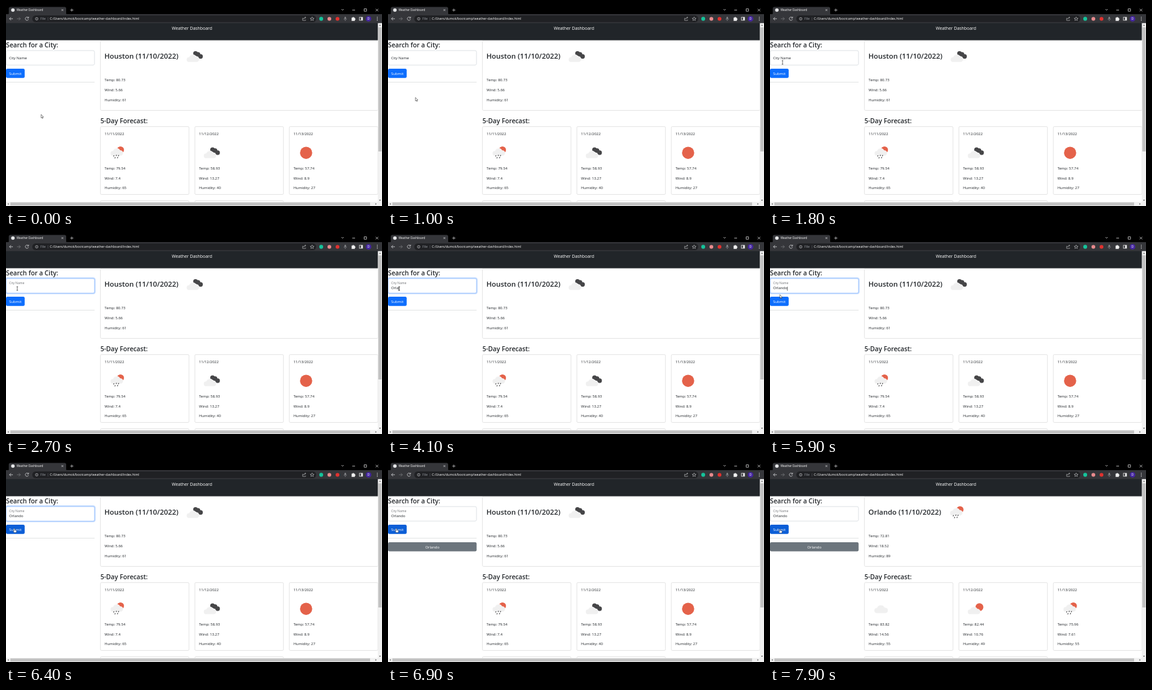
These frames come from a looping animation (600x319 px, 8000 ms). An HTML page:

```html
<!DOCTYPE html>
<html lang="en">
<head>
<meta charset="utf-8">
<title>Weather Dashboard</title>
<style>
html, body { margin: 0; width: 100%; height: 100%; overflow: hidden; background: #fff; }
svg { display: block; width: 600px; height: 319px; }
text { font-family: "Open Sans", "Noto Sans", sans-serif; white-space: pre; }
</style>
</head>
<body>
<svg id="stage" viewBox="0 0 600 319" xmlns="http://www.w3.org/2000/svg"></svg>
<script>
const stage = document.getElementById('stage');
const LOOP = 8000, STEP = 100;

// ---- markup helpers ----
const text = (x, y, size, str, fill = '#212529', extra = '') =>
  `<text x="${x}" y="${y}" font-size="${size}" fill="${fill}" ${extra}>${str}</text>`;
const rect = (x, y, w, h, fill, extra = '') =>
  `<rect x="${x}" y="${y}" width="${w}" height="${h}" fill="${fill}" ${extra}/>`;
const dot = (x, y, r, fill) => `<circle cx="${x}" cy="${y}" r="${r}" fill="${fill}"/>`;
const line = (d, color, w = 0.7) =>
  `<path d="${d}" fill="none" stroke="${color}" stroke-width="${w}"/>`;
const poly = (d, fill) => `<path d="${d}" fill="${fill}"/>`;
const card = (x, y, w, h) => rect(x, y, w, h, '#fff', 'rx="1.8" stroke="#d9d9d9" stroke-width=".7"');
const heading = (x, y, size, s) => text(x, y, size, s, '#212529', 'font-weight="600"');

// ---- weather icons, drawn around their centre ----
const SUN = '#e4624a', LIGHT = '#f0f0f0', DARK = '#464648';
const cloud = (x, y, s) =>
  `<path transform="translate(${x} ${y}) scale(${s})" fill="${LIGHT}" stroke="#fff" stroke-width=".6"
   d="M4 13A4 4 0 0 1 4.2 5A6.2 6.2 0 0 1 15.6 4.6A4.2 4.2 0 0 1 16.8 13Z"/>`;
const storm = dot(1.4, -5.2, 3.7, DARK) + dot(5.4, -3.8, 3.6, DARK) + dot(9.4, -0.6, 3.7, DARK);
const drops = [[-5, 4.7], [-1, 3.8], [2.5, 4.2], [-3, 7.7], [1, 7.3]]
  .map(([x, y]) => line(`M${x} ${y - 0.9}l-.9 1.8`, DARK, 1.2)).join('');
const icons = {
  sun: dot(0, -0.3, 9.7, SUN),
  cloud: cloud(-11.5, -7.5, 1.1),
  broken: storm + cloud(-13, -4.5, 1),
  partly: dot(6, -3, 6.3, SUN) + cloud(-13, -4.5, 1),
  rain: dot(5.2, -5, 5.6, SUN) + cloud(-11, -8.5, 1) + drops
};
const icon = (name, x, y) => `<g transform="translate(${x} ${y})">${icons[name]}</g>`;

// ---- forecasts: icon, temp, wind, humidity ----
const reports = [
  { city: 'Houston', iconX: 301, days: [
    ['broken', '80.73', '5.66', '61'], ['rain', '79.54', '7.4', '65'],
    ['broken', '58.93', '13.27', '40'], ['sun', '57.74', '8.9', '27']] },
  { city: 'Orlando', iconX: 298, days: [
    ['rain', '72.81', '18.52', '89'], ['cloud', '83.82', '14.56', '55'],
    ['partly', '82.44', '10.76', '49'], ['rain', '75.96', '7.61', '55']] }
];
const stats = (x, y, [, temp, wind, hum]) =>
  [`Temp: ${temp}`, `Wind: ${wind}`, `Humidity: ${hum}`]
    .map((s, i) => text(x, y + i * 15.7, 5.9, s)).join('');
const report = ({ city, iconX, days }) =>
  heading(157, 84.4, 11.4, `${city} (11/10/2022)`) +
  icon(days[0][0], iconX, 81) + stats(157.3, 120.4, days[0]) +
  days.slice(1).map((day, i) => {
    const x = 157.3 + i * 150.7;
    return text(x, 206.2, 5.9, `11/${11 + i}/2022`) +
      icon(day[0], x + 20.2, 234.5) + stats(x, 260.8, day);
  }).join('');

// ---- browser window ----
function chrome() {
  const g = '#d4d5d7';
  return rect(0, 0, 600, 14, '#000') +
    poly('M2 14Q4.5 14 4.5 11V4Q4.5 1.5 7 1.5H93.5Q96 1.5 96 4V11Q96 14 98.5 14Z', '#35363a') +
    rect(0, 13, 600, 14.3, '#35363a') +
    dot(11, 6.5, 2.8, '#e4e5e7') +
    text(17, 8.3, 4.5, 'Weather Dashboard', '#fff') +
    line('M88.5 5l3 3m0 -3l-3 3M102.5 6.5h5m-2.5 -2.5v5', g) +
    line('M535.3 5l1.8 1.8l1.8 -1.8M552.5 6.5h4.5M571.5 4.5h3.8v3.8h-3.8zM590 4.5l4 4m0 -4l-4 4', '#f0f0f0', 0.7) +
    line('M11 20.3h-5.5m2.5 -2.5l-2.5 2.5l2.5 2.5', g, 0.8) +
    line('M17.5 20.3h5.5m-2.5 -2.5l2.5 2.5l-2.5 2.5', '#77797c', 0.8) +
    line('M35.6 18.8a2.6 2.6 0 1 0 .3 2.3M36 17v2.2h-2.2', g, 0.8) +
    rect(42, 15, 453, 10.8, '#202124', 'rx="5.4"') +
    `<circle cx="49" cy="20.4" r="2.1" fill="none" stroke="${g}" stroke-width=".6"/>` +
    line('M49 20v1.5M49 19v.5', g, 0.5) +
    text(55, 22.3, 5.2, 'File', '#9aa0a6') + line('M67 18v5', '#6a6d70', 0.5) +
    text(70, 22.3, 5.18, 'C:/Users/dumok/bootcamp/weather-dashboard/index.html', '#fff') +
    line('M474.5 19.5h-1.2v3.5h4.8v-1.2M475 21q.3 -2.6 3.3 -2.6m-1.3 -1.2l1.3 1.2l-1.3 1.2', g, 0.6) +
    line('M488.5 17.5l.9 1.9l2.1 .2l-1.6 1.4l.5 2.1l-1.9 -1.1l-1.9 1.1l.5 -2.1l-1.6 -1.4l2.1 -.2z', g, 0.6) +
    dot(503, 20.4, 3.1, '#15c39a') + dot(516, 20.4, 3, '#e88a8d') + dot(529, 20.4, 3, '#e0322f') +
    rect(540.3, 17.3, 2.2, 3.8, '#8f9194', 'rx="1.1"') +
    line('M539.3 20q0 2.3 2.1 2.3t2.1 -2.3M541.4 22.3v1.5', '#8f9194', 0.6) +
    poly('M551.5 18.5h1.6a1 1 0 0 1 2 0h1.6v1.6a1 1 0 0 1 0 2v1.6h-5.2z', '#f0f0f0') +
    rect(564, 18, 5, 4.8, 'none', 'stroke="#f0f0f0" stroke-width=".8"') + rect(566.7, 18, 2.3, 4.8, '#f0f0f0') +
    dot(578.5, 20.4, 4.4, '#4527a0') +
    text(578.5, 22.2, 4.8, 'D', '#fff', 'text-anchor="middle"') +
    [18, 20.4, 22.8].map(y => dot(592.5, y, 0.7, g)).join('');
}

function scrollbars() {
  return rect(593.4, 27, 6.6, 292, '#f1f1f1') + rect(0, 312.5, 600, 6.5, '#f1f1f1') +
    rect(594.2, 34, 5.2, 198, '#c1c1c1') + rect(7, 313.3, 574, 5, '#c1c1c1') +
    poly('M595.3 31.5l1.5 -1.9l1.5 1.9zM595.3 309l1.5 1.9l1.5 -1.9zM4.4 314.3l-1.9 1.5l1.9 1.5zM589.5 314.3l1.9 1.5l-1.9 1.5z', '#606060');
}

stage.innerHTML =
  rect(0, 0, 600, 319, '#fff') +
  card(150.7, 55, 443, 111.5) +
  [0, 1, 2].map(i => card(150.7 + i * 150.7, 192.3, 141.3, 108.3)).join('') +
  [0, 1].map(i => card(150.7 + i * 150.7, 310.5, 141.3, 30)).join('') +
  rect(0, 27, 600, 27.6, '#212529') +
  text(296.7, 38, 6.9, 'Weather Dashboard', '#fff', 'text-anchor="middle"') +
  heading(0, 65.6, 10.25, 'Search for a City:') + heading(150.7, 187, 10.25, '5-Day Forecast:') +
  rect(-0.6, 70.2, 142.6, 24.9, 'none', 'id="ring" rx="3" stroke="#0d6efd" stroke-opacity=".25" stroke-width="1.8"') +
  rect(0.3, 71.1, 140.9, 23.1, '#fff', 'id="field" rx="2.2" stroke-width=".7"') +
  '<text id="label" fill="#212529">City Name</text>' +
  text(5, 88.4, 5.9, '', '#212529', 'id="value"') +
  rect(0, 84, 0.6, 6.6, '#111', 'id="caret"') +
  rect(0, 100, 29.8, 14.7, '#0d6efd', 'id="submit" rx="2.3"') +
  text(14.9, 109.6, 6, 'Submit', '#fff', 'text-anchor="middle"') +
  rect(0, 121, 141.4, 0.6, '#cfd0d1') +
  `<g id="history">${rect(0, 128, 141.4, 14.6, '#6c757d', 'rx="2.3"')}${
    text(70.7, 137.5, 5.9, 'Orlando', '#fff', 'text-anchor="middle"')}</g>` +
  reports.map((r, i) => `<g id="report${i}">${report(r)}</g>`).join('') +
  scrollbars() + chrome() +
  `<g id="pointer">
    <path id="arrow" d="M0 0V5.6L1.3 4.4L2.2 6.4L3 6L2.2 4.1H3.9Z" fill="#fff" stroke="#111" stroke-width=".5"/>
    <path id="beam" d="M-1.2 -3H1.2M0 -3V3M-1.2 3H1.2" fill="none" stroke="#111" stroke-width=".6"/>
    <path id="hand" d="M-.6 0Q0 -.7 .6 0V2.2L3 2.8Q3.5 3 3.4 3.6L2.8 6H-.6L-2.2 3.6Q-2 2.9 -1.3 3.3L-.6 3.9Z" fill="#fff" stroke="#111" stroke-width=".4"/>
  </g>`;

const el = id => document.getElementById(id);
const show = (id, on) => el(id).setAttribute('display', on ? 'inline' : 'none');
const set = (id, attrs) => { for (const k in attrs) el(id).setAttribute(k, attrs[k]); };
const clamp = v => Math.max(0, Math.min(1, v));
const ease = v => v * v * (3 - 2 * v);
const mix = (a, b, k) => a + (b - a) * k;

// ---- timeline ----
const path = [
  [0, 56, 173], [400, 56, 173], [700, 50, 161], [800, 50, 161], [1700, 22, 93],
  [1900, 18, 87], [5700, 18, 87], [6100, 13.5, 106.5], [7300, 13.5, 106.5],
  [7500, 14.2, 106.8], [7800, 14.2, 106.8], [7900, 16, 107.2], [8000, 16, 107.2]
];
const keys = [3400, 3700, 3900, 4100, 4300, 4500, 4800];
const FOCUS = 2050, BLUR = 6450, ADDED = 6700, LOADED = 7400;

function pointerAt(t) {
  const i = path.findIndex((p, n) => n && t <= p[0]);
  const [t0, x0, y0] = path[i - 1], [t1, x1, y1] = path[i];
  const k = (t - t0) / (t1 - t0);
  return [mix(x0, x1, k), mix(y0, y1, k)];
}

function draw(now) {
  const t = Math.floor((now % LOOP) / STEP) * STEP;

  const [x, y] = pointerAt(t);
  const inField = y > 71 && y < 94.5 && x < 141;
  const onSubmit = y > 100 && y < 115 && x < 30;
  set('pointer', { transform: `translate(${x} ${y})` });
  show('beam', inField);
  show('hand', onSubmit);
  show('arrow', !inField && !onSubmit);
  set('submit', { fill: onSubmit ? '#0b5ed7' : '#0d6efd' });

  const glow = clamp((t - FOCUS) / 150) * (1 - clamp((t - BLUR) / 150));
  set('ring', { opacity: glow });
  set('field', { stroke: `rgb(${mix(206, 134, glow)},${mix(212, 183, glow)},${mix(218, 254, glow)})` });

  const up = ease(clamp((t - FOCUS) / 100));
  set('label', { x: 5, y: mix(85.2, 79.8, up), 'font-size': mix(5.9, 5.05, up), opacity: mix(1, 0.65, up) });

  const typed = keys.filter(k => k <= t).length;
  el('value').textContent = 'Orlando'.slice(0, typed);
  const since = t - (typed ? keys[typed - 1] : 2200);
  show('caret', t >= FOCUS && t < BLUR && (since < 0 || since % 1000 < 500));
  set('caret', { x: 5 + (typed ? el('value').getComputedTextLength() : 0) });

  show('history', t >= ADDED);
  show('report0', t < LOADED);
  show('report1', t >= LOADED);
}

const start = performance.now();
function tick() {
  draw(performance.now() - start);
  requestAnimationFrame(tick);
}
tick();
</script>
</body>
</html>
```
